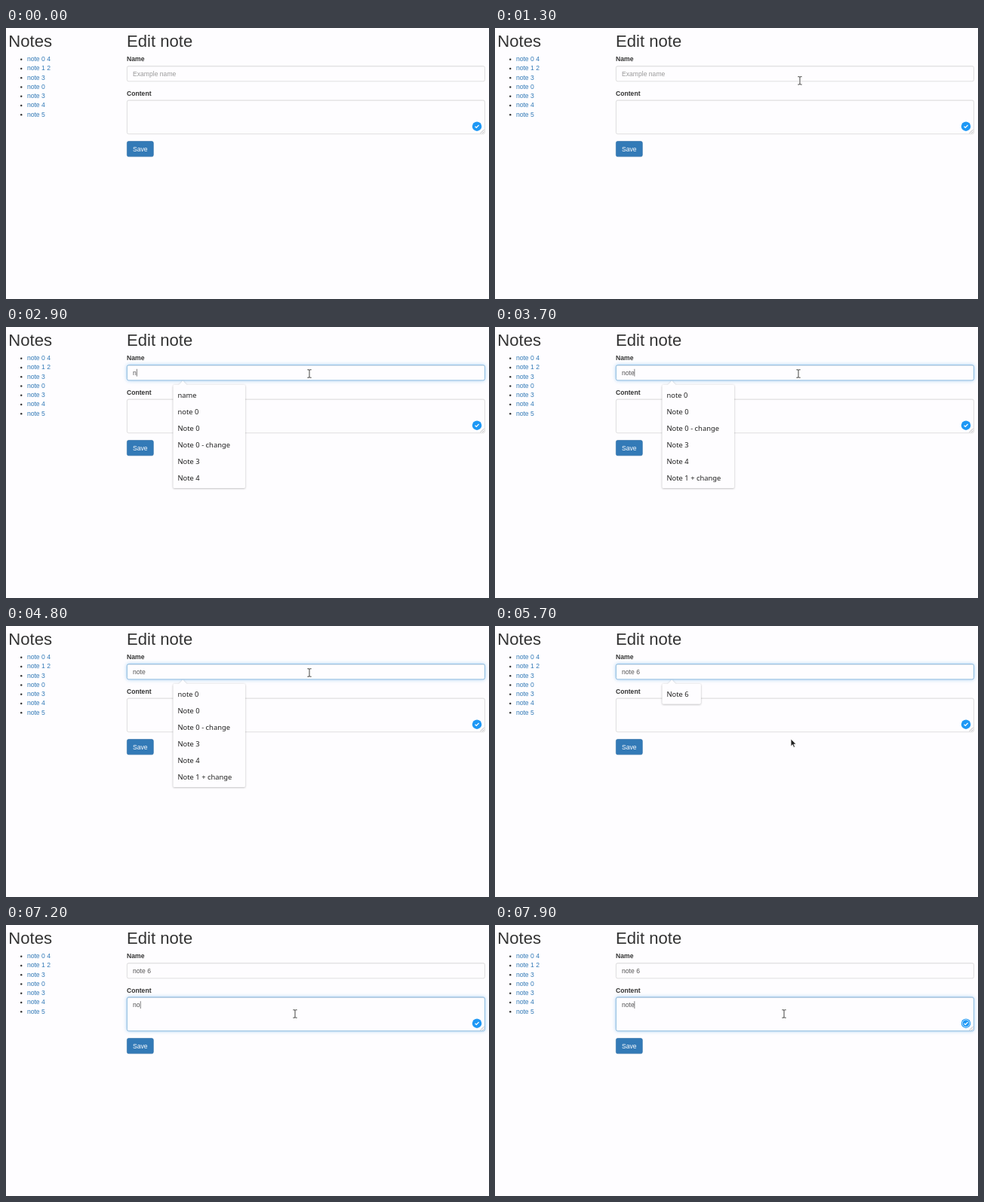
An HTML page that plays this animation: 640x360 px, repeating every 8000 ms.

```html
<!DOCTYPE html>
<html lang="en">
<head>
<meta charset="utf-8">
<title>Edit note</title>
<style>
  :root { --paper: #fefdff; }
  * { box-sizing: border-box; }
  html, body { margin: 0; width: 100%; height: 100%; overflow: hidden; background: var(--paper); }
  #stage {
    position: absolute; left: 0; top: 0; width: 1044px; height: 587px; overflow: hidden;
    transform: scale(.6133); transform-origin: 0 0;
    font: 14px/20px "Liberation Sans", Arial, sans-serif; color: #333;
  }
  #stage > * { position: absolute; }
  h1 { margin: 0; top: 7.6px; font-size: 36px; line-height: 39.6px; font-weight: 500; font-weight: normal; }
  ul { margin: 0; padding-left: 40px; left: 5.5px; top: 57.2px; }
  li span { color: #337ab7; }
  b, .field, .save { left: 261px; }
  .field {
    width: 774px; padding: 6px 12px; white-space: pre; color: #555; background: var(--paper);
    border: 1px solid #ccc; border-radius: 4px; box-shadow: inset 0 1px 1px rgba(0,0,0,.075);
  }
  .field::after {
    content: ""; position: absolute; inset: -1px; opacity: var(--focus, 0);
    border: 1px solid #66afe9; border-radius: 4px;
    box-shadow: inset 0 1px 1px rgba(0,0,0,.075), 0 0 8px rgba(102,175,233,.6);
  }
  .field i { display: inline-block; width: 1px; height: 16px; margin-right: -1px; vertical-align: -3px; background: #333; }
  .field em { font-style: normal; color: #999; }
  .save {
    top: 245.2px; height: 34px; padding: 6px 12px; color: #fff;
    background: #337ab7; border: 1px solid #2e6da4; border-radius: 4px;
  }
  #popup {
    left: 360.8px; top: 125.2px; padding: 4px 10px; border-radius: 3px; background: var(--paper);
    filter: drop-shadow(0 1px 2px rgba(0,0,0,.3));
    font: 15.3px/36px "Noto Sans", "Open Sans", sans-serif; color: #222; white-space: pre;
  }
  #popup::before {
    content: ""; position: absolute; left: 15px; top: -6px; width: 12px; height: 12px;
    background: var(--paper); transform: rotate(45deg);
  }
  #rows { position: relative; }
  svg { left: 0; top: 0; }
</style>
</head>
<body>
<div id="stage">
  <h1 style="left:5.5px">Notes</h1>
  <ul id="notes"></ul>
  <h1 style="left:261px">Edit note</h1>
  <b style="top:57.2px">Name</b>
  <div class="field" id="name" style="top:82.2px;height:34px"><span></span><i></i><em>Example name</em></div>
  <b style="top:131.2px">Content</b>
  <div class="field" id="content" style="top:156.2px;height:74px"><span></span><i></i></div>
  <div class="save">Save</div>
  <svg width="1044" height="587" fill="none">
    <path d="M1025 228l8-8M1029.500 228l3.500-3.500" stroke="#888"/>
    <circle cx="1017.500" cy="213" r="10.200" fill="#1e98f5"/>
    <path d="M1013.500 213.200l2.800 2.800 5.200-5.600" stroke="#fff" stroke-width="2"/>
    <circle id="ring" cx="1017.500" cy="213" r="7.800" stroke="#fff" stroke-width="1.200"/>
  </svg>
  <div id="popup"><div id="rows"></div></div>
  <svg width="1044" height="587">
    <g id="beam" fill="none" stroke-linecap="square">
      <path id="bar" d="M-3.500-8.500h2.500l1 1 1-1h2.500M0-7.500v15M-3.500 8.500h2.500l1-1 1 1h2.500" stroke="#fff" stroke-width="3.500"/>
      <use href="#bar"/>
      <path d="M-3.500-8.500h2.500l1 1 1-1h2.500M0-7.500v15M-3.500 8.500h2.500l1-1 1 1h2.500" stroke="#333" stroke-width="1.500"/>
    </g>
    <path id="arrow" d="M0 0v15.500l3.600-3.400 2.500 5.800 2.600-1.100-2.500-5.700h5z" fill="#222" stroke="#fff"/>
  </svg>
</div>
<script>
const LOOP = 8000, SCALE = .6133;
const $ = id => document.getElementById(id);

const history6 = ["name", "note 0", "Note 0", "Note 0 - change", "Note 3", "Note 4", "Note 1 + change", "Note 6"];
const fields = {
  name: { text: "note 6", keys: [2600, 3200, 3500, 3700, 3950, 4850], focus: [1580, 6260], wake: [1580, 1800] },
  content: { text: "note", keys: [6900, 7200, 7500, 7780], focus: [6260, LOOP + 500], wake: [6260, 6400] }
};
const popupOpen = 1800, popupFade = [6300, 6500];

// Pointer stops: time, x, y
const path = [
  [250, 648, 292], [700, 570, 258], [1100, 462, 200], [1290, 404, 70], [1450, 402, 62],
  [5250, 402, 62], [5620, 393, 152], [5720, 392, 150], [6080, 383, 118]
];

$("notes").innerHTML = ["0 4", "1 2", "3", "0", "3", "4", "5"]
  .map(n => `<li><span>note ${n}</span></li>`).join("");

const clamp = v => Math.max(0, Math.min(1, v));
const ramp = (t, a, b) => clamp((t - a) / (b - a));
const show = (el, on) => { el.style.display = on ? "" : "none"; };

function pointerAt(t) {
  let k = 0;
  while (k < path.length - 2 && t > path[k + 1][0]) k++;
  const [t0, x0, y0] = path[k], [t1, x1, y1] = path[k + 1];
  const p = ramp(t, t0, t1), e = p * p * (3 - 2 * p);
  return [x0 + (x1 - x0) * e, y0 + (y1 - y0) * e];
}

const typed = (f, t) => f.text.slice(0, f.keys.filter(k => t >= k).length);

function drawField(id, t) {
  const f = fields[id], el = $(id), text = typed(f, t), [on, off] = f.focus;
  const last = Math.max(...[...f.wake, ...f.keys].filter(k => t >= k));
  const blink = Math.floor((t - last) / 500) % 2 === 0;
  el.children[0].textContent = text;
  el.children[1].style.visibility = t >= on && t < off && blink ? "" : "hidden";
  if (el.children[2]) show(el.children[2], !text);
  el.style.setProperty("--focus", ramp(t, on, on + 150) - ramp(t, off, off + 150));
}

function drawPopup(t) {
  const start = typed(fields.name, t);
  const rows = history6.filter(h => h.toLowerCase().startsWith(start)).slice(0, 6);
  const popup = $("popup");
  $("rows").textContent = rows.join("\n");
  popup.style.width = (rows.length > 1 ? 156 : 84) + "px";
  popup.style.opacity = 1 - ramp(t, ...popupFade);
  show(popup, t >= popupOpen && t < popupFade[1]);
}

function drawPointer(t) {
  const [x, y] = pointerAt(t);
  const inside = (top, bottom) => x > 160 && x < 635 && y > top && y < bottom;
  const overText = inside(50, 71.2) || inside(95.8, 141);
  const place = `translate(${x / SCALE} ${y / SCALE})`;
  for (const id of ["beam", "arrow"]) {
    $(id).setAttribute("transform", place);
    show($(id), (id === "beam") === overText);
  }
}

function draw(t) {
  drawField("name", t);
  drawField("content", t);
  drawPopup(t);
  drawPointer(t);
  show($("ring"), t >= 7300);
}

const begin = performance.now();
function tick() {
  draw((performance.now() - begin) % LOOP);
  requestAnimationFrame(tick);
}
tick();
</script>
</body>
</html>
```
